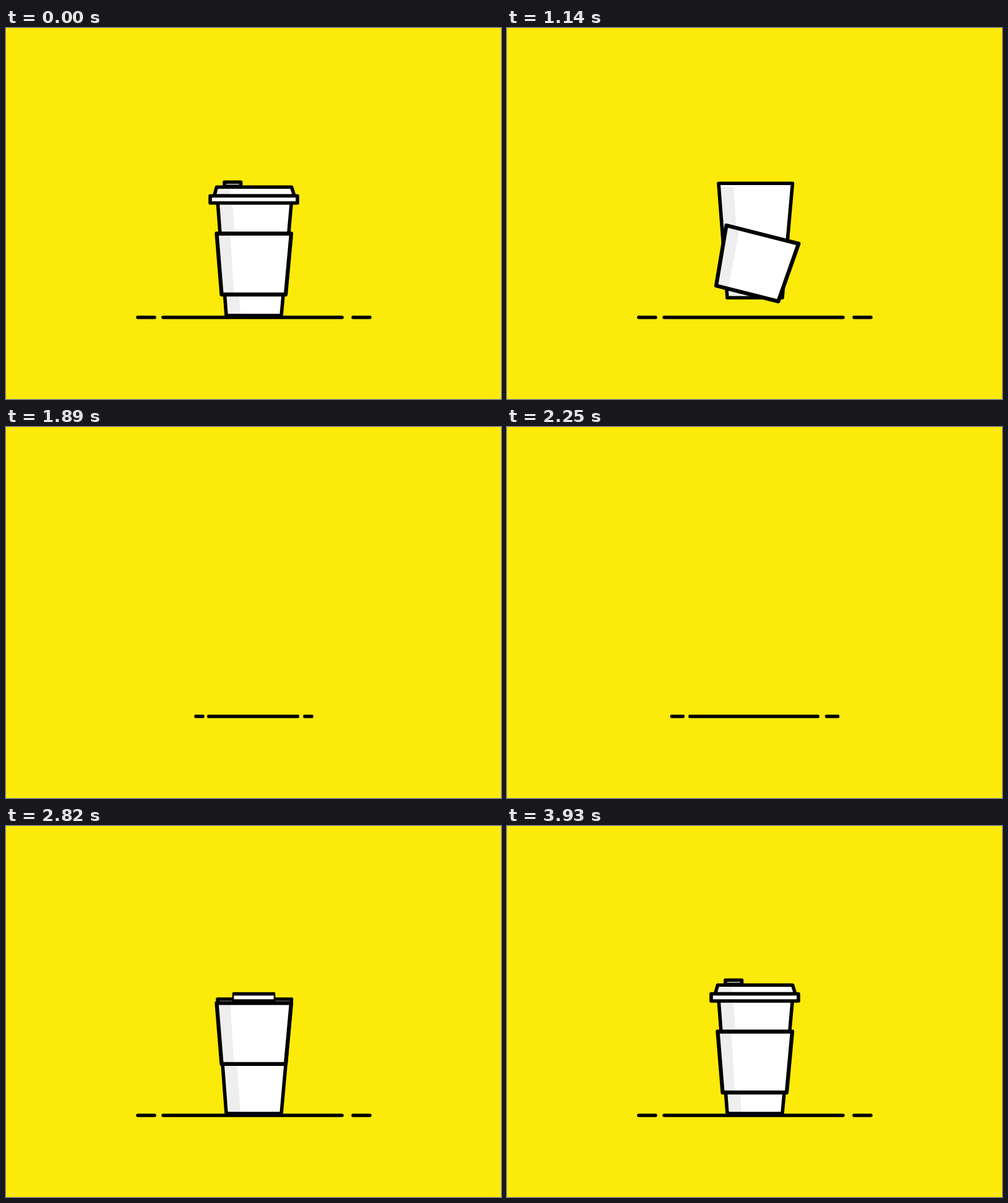
Write an HTML page that moves like this. It is 800 by 600 pixels and loops after 3990 ms.

```html
<!DOCTYPE html>
<html lang="en">
<head>
<meta charset="utf-8">
<title>Paper cup</title>
<style>
  html, body { margin: 0; width: 100%; height: 100%; overflow: hidden; background: #fcea0a; }
  svg { display: block; width: 800px; height: 600px; }
  g { transform-box: view-box; }
  .ink { fill: none; stroke: #000; stroke-width: 5.6; stroke-linecap: round; stroke-linejoin: round; }
  .paper { fill: #fff; }
  .shade { fill: #eee; }
  #ground { transform-origin: 400.5px 468px; }
  #body { transform-origin: 401px 372.5px; }
  #sleeve { transform-origin: 400.5px 382px; }
  #sleeve .ink { stroke-width: 6.3; }
  #brim { transform-origin: 400.5px 277px; }
  #lid { transform-origin: 400.5px 271px; }
  #tab { transform-origin: 366px 253px; }
</style>
</head>
<body>
<svg viewBox="0 0 800 600">
  <g id="ground">
    <path class="ink" d="M213 468H240M254 468H543M561 468H588"/>
  </g>
  <g id="body">
    <path class="paper" d="M342 280H461.5L445 465H356Z"/>
    <path class="shade" d="M342 285.5H366L379 463.5H356Z"/>
    <path class="ink" d="M342 280H461.5L445 465H356Z"/>
  </g>
  <g id="sleeve">
    <path class="paper" d="M340.5 332.5H461L452 431H348.5Z"/>
    <path class="shade" d="M340.5 332.5H362.5L368.5 431H348.5Z"/>
    <path class="ink" d="M340.5 332.5H461L452 431H348.5Z"/>
  </g>
  <g id="tab">
    <path class="ink" style="fill:#eee" d="M353 249.3H379.5V256H353Z"/>
  </g>
  <g id="lid">
    <path class="paper" d="M340.5 257.2H461.5L466 271.5H336.5Z"/>
    <path class="shade" d="M340.5 257.2H362L363.5 271.5H336.5Z"/>
    <path class="ink" d="M340.5 257.2H461.5L466 271.5H336.5Z"/>
  </g>
  <g id="brim">
    <path class="ink" style="fill:#fff" d="M330 271.5H471V283H330Z"/>
  </g>
</svg>
<script>
const LOOP = 3990;
const IN = 'cubic-bezier(.333,0,.667,0)';
const OUT = 'cubic-bezier(.333,.667,.667,1)';
const SLOW = 'cubic-bezier(.25,1,.5,1)';
const BOTH = 'cubic-bezier(.37,0,.63,1)';

// Each step: time in ms, value, easing towards the next step.
function track(id, prop, format, steps) {
  const first = steps[0], last = steps[steps.length - 1];
  const frames = [[0, first[1]], ...steps, [LOOP, last[1]]].map(([t, v, easing = 'linear']) =>
    ({ offset: t / LOOP, [prop]: format(v), easing }));
  document.getElementById(id).animate(frames, { duration: LOOP, iterations: Infinity });
}

const up = v => `0px ${-v}px`;
const wide = v => `${v} 1`;
const tall = v => `1 ${v}`;
const both = v => Array.isArray(v) ? v.join(' ') : `${v} ${v}`;
const turn = v => `${v}deg`;

track('ground', 'scale', wide, [[1600, 1, IN], [1968, 0], [2043, 0, SLOW], [2816, 1]]);

track('tab', 'translate', up, [
  [260, 0, BOTH], [450, 85, BOTH], [580, -6],
  [3180, -6, BOTH], [3320, 85, BOTH], [3530, 0]]);
track('tab', 'scale', both, [[570, 1], [600, 0], [3160, 0], [3190, 1]]);

track('lid', 'scale', tall, [[590, 1, IN], [690, 0], [3060, 0, OUT], [3170, 1]]);

track('brim', 'scale', wide, [
  [660, 1, BOTH], [805, 1.5, IN], [920, 0],
  [2752, 0], [2970, 1.5, BOTH], [3090, 1]]);

track('body', 'translate', up, [
  [980, 0, BOTH], [1330, 66], [1480, 76], [2460, 76, IN], [2710, 0]]);
track('body', 'scale', both, [
  [1330, 1, IN], [1500, 0], [2340, 0],
  [2450, [1, .7]], [2460, [1, .75]], [2530, 1]]);

track('sleeve', 'translate', up, [
  [1180, 0, BOTH], [1480, 93], [2640, 93, BOTH], [3000, 0]]);
track('sleeve', 'rotate', turn, [
  [900, 0, OUT], [1090, 14.2], [1570, 14.2, IN], [1880, 180],
  [2280, 130, OUT], [2580, 0]]);
track('sleeve', 'scale', both, [[1590, 1, IN], [1880, 0], [2280, 0], [2445, 1]]);
</script>
</body>
</html>
```
